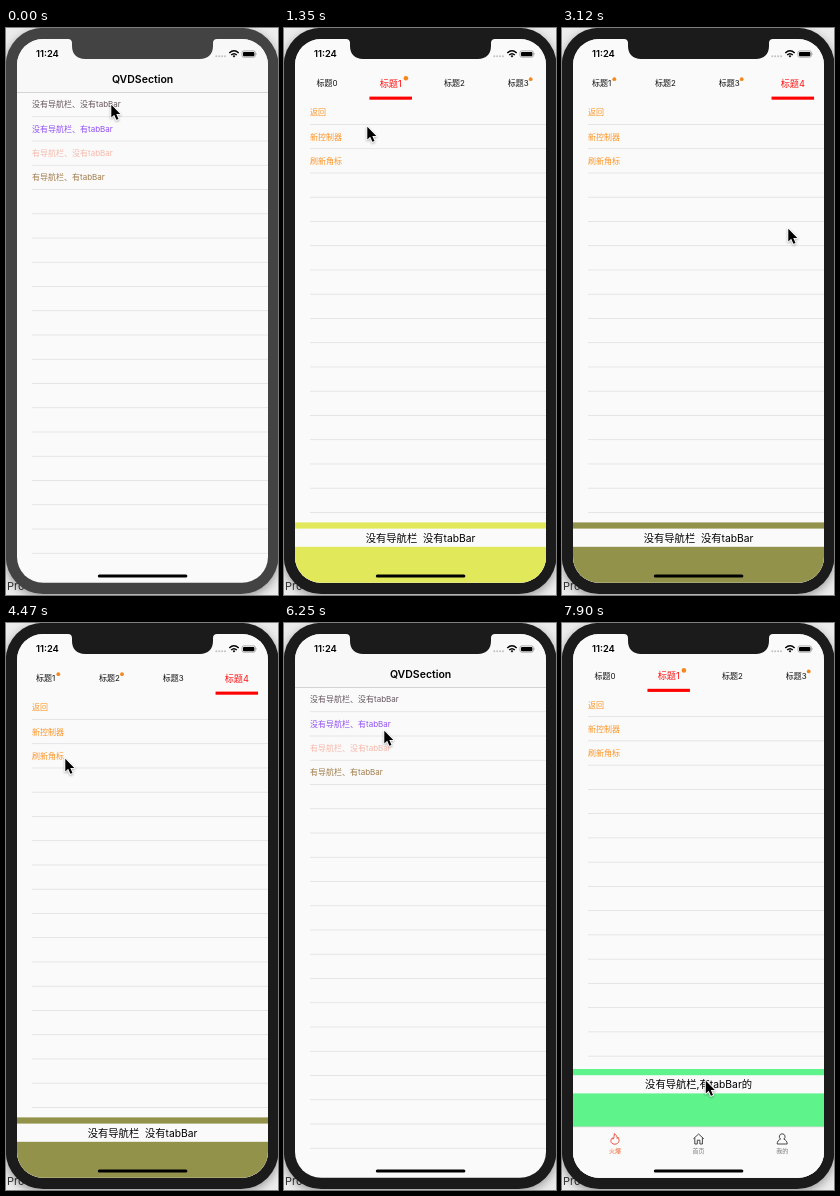
Write an HTML page that moves like this. It is 272x567 px and loops after 8000 ms.

```html
<!DOCTYPE html>
<html lang="zh-CN">
<head>
<meta charset="utf-8">
<title>Segment pager</title>
<style>
  html, body { margin: 0; width: 100%; height: 100%; overflow: hidden; background: #ececec; }
  svg { display: block; width: 272px; height: 567px; }
  text { font-family: Inter, 'Noto Sans CJK SC', 'Noto Sans CJK', sans-serif; }
  .mid { text-anchor: middle; }
  .bold { font-weight: 600; }
  #body { filter: drop-shadow(0 3px 5px rgba(0, 0, 0, .35)); }
  #cursor { filter: drop-shadow(0 1px 1px rgba(0, 0, 0, .3)); }
</style>
</head>
<body>
<svg viewBox="0 0 272 567">
  <defs>
    <clipPath id="screenClip"><rect x="11" y="11" width="251" height="543.8" rx="26"/></clipPath>
    <linearGradient id="edge">
      <stop offset="0" stop-color="#000" stop-opacity="0"/>
      <stop offset="1" stop-color="#000" stop-opacity=".24"/>
    </linearGradient>
  </defs>
  <rect width="272" height="567" fill="#ececec"/>
  <text x="1" y="562" font-size="11" fill="#333">Pro</text>
  <rect id="body" x="-.3" y="-.3" width="272.8" height="566.3" rx="37.5"/>
  <g clip-path="url(#screenClip)">
    <rect x="11" y="11" width="252" height="544" fill="#fafafa"/>
    <g id="home"></g>
    <rect id="dim" x="11" y="11" width="252" height="544"/>
    <g id="pager">
      <rect x="7" y="11" width="4" height="544" fill="url(#edge)"/>
      <rect x="11" y="11" width="252" height="544" fill="#fafafa"/>
      <g id="content">
        <g id="pages"></g>
        <g id="titles"></g>
        <rect id="bar" y="68.6" width="42.5" height="3.1" fill="#f00"/>
        <g id="tabs"></g>
      </g>
    </g>
    <g id="nav">
      <g id="navBack">
        <rect x="11" y="11" width="252" height="53.5" fill="#f8f8f8"/>
        <rect x="11" y="64" width="252" height=".7" fill="#c4c4c4"/>
      </g>
      <text class="mid bold" x="136.6" y="54.7" font-size="10.5">QVDSection</text>
    </g>
    <text class="bold" x="30" y="29.4" font-size="9.4">11:24</text>
    <path d="M210.3 28.3h9" stroke="#c2c2c2" stroke-width="2" stroke-linecap="round" stroke-dasharray="0 2.9"/>
    <g fill="none" stroke="#000" stroke-width="1.5">
      <path d="M223.3 25Q228 20.6 232.7 25M225.2 27Q228 24.4 230.8 27"/>
      <path d="M226.6 27.9Q228 26.8 229.4 27.9L228 29.4Z" fill="#000" stroke="none"/>
    </g>
    <rect x="236" y="22.9" width="13.4" height="6.3" rx="1.8" fill="none" stroke="#777" stroke-width=".6"/>
    <rect x="237" y="23.9" width="11.4" height="4.3" rx="1"/>
    <path d="M250.2 25q1.1 1 0 2.1z" fill="#777"/>
  </g>
  <path id="notch" d="M62 10H211V11C208.5 11 207 12.5 207 15V18C207 26 202 31 194 31H79C71 31 66 26 66 18V15C66 12.5 64.5 11 62 11Z"/>
  <rect id="indicator" x="91.8" y="546.4" width="89.6" height="3.1" rx="1.55"/>
  <g id="cursor">
    <path d="M.3.8V13.4L3.2 10.7 5.4 15.8 7.5 14.9 5.3 9.9H9.3Z" stroke="#fff" stroke-width="1.8" paint-order="stroke" stroke-linejoin="round"/>
  </g>
</svg>
<script>
const LOOP = 8000, START = 582, TICK = 149;  // the picture refreshes once per tick
const WIDTH = 251.5, ROW = 24.25, CELL = 63.7;
const SLIDE = 3.1, SWIPE = 2.76;             // durations in ticks
const $ = id => document.getElementById(id);

function add(parent, tag, attrs, content) {
  const node = document.createElementNS('http://www.w3.org/2000/svg', tag);
  set(node, attrs);
  if (content) node.textContent = content;
  return parent.appendChild(node);
}
function set(node, attrs) {
  for (const key in attrs) node.setAttribute(key, attrs[key]);
}
function show(node, on) { node.style.display = on ? '' : 'none'; }
function move(node, x, y) { node.setAttribute('transform', `translate(${x} ${y})`); }

// Text whose vertical middle sits at y
function label(parent, str, x, y, size, fill, cls = '') {
  return add(parent, 'text', { x, y: y + size * .37, 'font-size': size, fill, class: cls }, str);
}
function lines(parent, top, count) {
  for (let i = 1; i <= count; i++)
    add(parent, 'rect', { x: 26, y: top + ROW * i - .4, width: 237, height: .8, fill: '#e0e0e0' });
}

// Home list
const home = $('home');
lines(home, 64.5, 19);
['#66565f', '#9250f5', '#f8b9aa', '#a17c4c'].forEach((fill, i) => {
  const str = `${i < 2 ? '没' : ''}有导航栏、${i % 2 ? '' : '没'}有tabBar`;
  label(home, str, 26, 76.4 + ROW * i, 8, fill);
});

// Pages
function makePage(color, caption, footTop) {
  const g = add($('pages'), 'g');
  lines(g, 72.2, 17);
  ['返回', '新控制器', '刷新角标'].forEach((str, i) => label(g, str, 26, 84.5 + ROW * i, 8, '#ff9526'));
  add(g, 'rect', { x: 11, y: footTop, width: WIDTH, height: 62, fill: color });
  add(g, 'rect', { x: 11, y: footTop + 6.2, width: WIDTH, height: 18.2, fill: '#fafafa' });
  label(g, caption, 136.6, footTop + 15.3, 10.3, '#000', 'mid');
  return g;
}
const plain = ['#8fb8d8', '#e1e95b', '#c5a8a5', '#197b17', '#93924b']
  .map(color => makePage(color, '没有导航栏\u00a0\u00a0没有tabBar', 494.4));
const tabbed = makePage('#5ff38c', '没有导航栏,有tabBar的', 448.8);

// Segment titles with badges
const titles = plain.map((_, i) => {
  const g = add($('titles'), 'g');
  return {
    g,
    text: add(g, 'text', { class: 'mid' }, '标题' + i),
    dot: add(g, 'circle', { fill: '#f5871f' })
  };
});

// Tab bar
const tabs = $('tabs');
add(tabs, 'rect', { x: 11, y: 506.6, width: 252, height: 60, fill: '#fafafa' });
add(tabs, 'rect', { x: 11, y: 506.4, width: 252, height: .6, fill: '#c8c8c8' });
const icons = {
  火爆: 'M-.6-5.5C.8-4 2.6-2.6 2.2-.5L3.2-1.6C4.6.6 4.6 5-.2 5.2C-5 5-4.8.6-2.6-1.2L-2 .2C-.6-1.6-1-3.6-.6-5.5Z',
  首页: 'M-5.2-.2L0-5 5.2-.2M-3.8-1.2V5H-1.3V1.2H1.3V5H3.8V-1.2',
  我的: 'M0-5.2a2.9 2.9 0 0 1 1.6 5.3C3.6.9 5 2.4 5 5H-5C-5 2.4-3.6.9-1.6.1A2.9 2.9 0 0 1 0-5.2'
};
Object.entries(icons).forEach(([str, d], i) => {
  const x = 53 + 83.6 * i;
  const icon = add(tabs, 'path', { d, fill: 'none', stroke: i ? '#333' : '#e63c28', 'stroke-width': .9 });
  move(icon, x, 518.8);
  label(tabs, str, x, 530.6, 6, i ? '#777' : '#f0602e', 'mid');
});

// Eased progress from 0 to 1, beginning at tick `from`
function ease(n, from, length) {
  const k = Math.min(1, Math.max(0, (n - from) / length));
  return k * k * (3 - 2 * k);
}

// Resting places of the pointer: tick, x, y
const stops = [[4, 105, 76], [5, 83, 98], [7, 226, 200], [17, 226, 200], [20, 59, 135], [28, 59, 135],
  [32, 34, 88], [35, 34, 88], [38, 100, 107], [43, 100, 107], [47, 119, 494], [49, 143.5, 457]];

function pointer(n) {
  const next = stops.findIndex(stop => stop[0] > n);
  if (next < 1) return stops.at(next).slice(1);
  const [a, b] = [stops[next - 1], stops[next]];
  const k = (n - a[0]) / (b[0] - a[0]);
  return [1, 2].map(i => a[i] + (b[i] - a[i]) * k);
}

function badges(n, hasTabs) {
  if (n < 20 || hasTabs) return [1, 3];
  return n < 26 ? [3, 4] : [1, 2];
}

function drawTitles(pos, marked) {
  const big = Math.round(pos), red = Math.floor(pos + .05);
  const scroll = Math.max(0, (big + 1) * CELL - WIDTH);
  titles.forEach(({ g, text, dot }, i) => {
    const on = i === big, size = on ? 9.2 : 8;
    move(g, 43 + CELL * i - scroll, 55.4);
    set(text, { y: size * .37, 'font-size': size, fill: i === red ? '#ff1414' : '#111' });
    set(dot, { cx: on ? 15.2 : 12.6, cy: on ? -5.2 : -4.2, r: on ? 2.3 : 1.9 });
    show(dot, marked.includes(i));
  });
  set($('bar'), { x: 43 + CELL * pos - scroll - 21.25 });
}

function render(t) {
  const n = Math.floor((t - START) / TICK);
  const hasTabs = n >= 39;
  const lowered = hasTabs && n < 43;
  const push = ease(n, 1, SLIDE) - ease(n, 33, SLIDE) + ease(n, 40, 2);
  const swiped = [7, 10, 14].reduce((sum, from) => sum + ease(n, from, SWIPE), 1);
  const pos = hasTabs ? 1 : swiped;

  const shell = n < 0 ? '#434343' : '#1b1b1b';
  set($('body'), { fill: shell });
  set($('notch'), { fill: shell });

  move(home, -75 * push, 0);
  set($('dim'), { opacity: .11 * push });
  show($('pager'), push > 0);
  move($('pager'), WIDTH * (1 - push), 0);
  move($('content'), 0, hasTabs ? (lowered ? 45.7 : -2.8) : 0);

  plain.forEach((page, i) => {
    show(page, !hasTabs && Math.abs(i - pos) < 1);
    move(page, (i - pos) * WIDTH, 0);
  });
  show(tabbed, hasTabs);
  show(tabs, hasTabs);
  drawTitles(pos, badges(n, hasTabs));

  show($('nav'), push < 1 || lowered);
  show($('navBack'), push < 1);
  set($('indicator'), { opacity: Math.round(pos) === 3 ? .75 : 1 });

  // Dragging a page pulls the pointer left
  const [x, y] = pointer(n);
  move($('cursor'), x - 75 * Math.sin(Math.PI * (pos % 1)), y);
}

const start = performance.now();
function frame() {
  render((performance.now() - start) % LOOP);
  requestAnimationFrame(frame);
}
frame();
</script>
</body>
</html>
```
